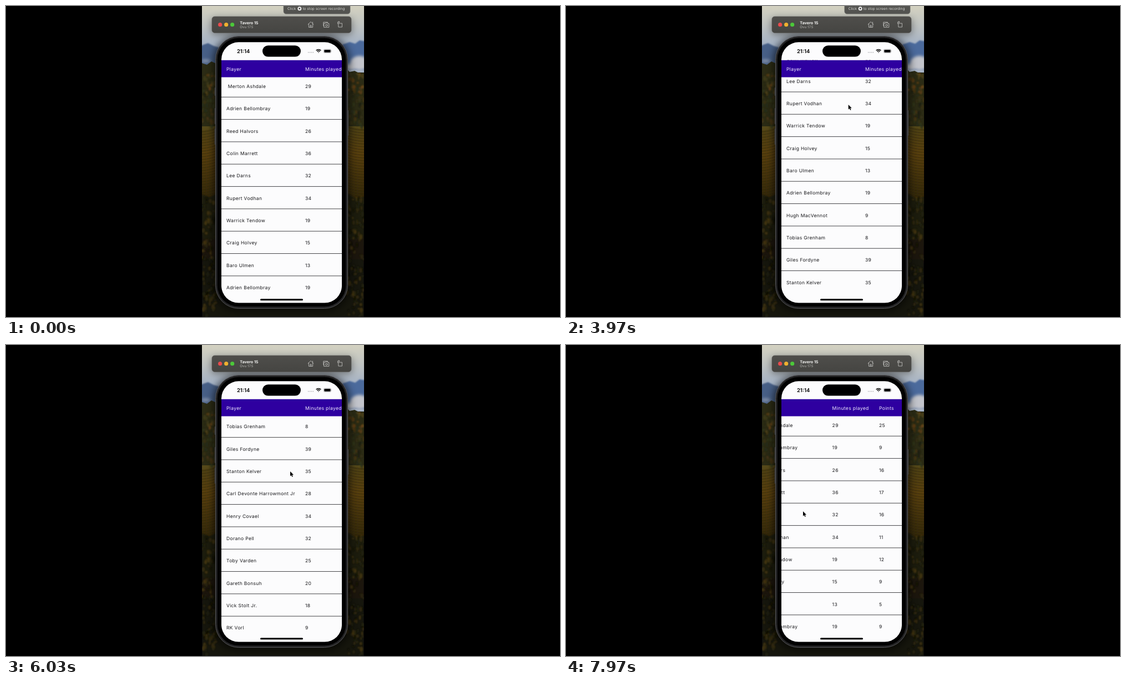
An HTML page that plays this animation: 998x561 px, repeating every 8 s.

```html
<!DOCTYPE html>
<html lang="en">
<head>
<meta charset="utf-8">
<title>Player table</title>
<style>
  html, body { margin: 0; width: 100%; height: 100%; overflow: hidden; background: #000; }
  svg { display: block; font-family: Inter, Roboto, sans-serif; text-rendering: geometricPrecision; }
  .table { font-size: 8.5px; letter-spacing: .35px; white-space: pre; }
  .icon { fill: none; stroke: #c9c9c7; stroke-width: .8; stroke-linejoin: round; stroke-linecap: round; }
</style>
</head>
<body>
<svg width="998" height="561" viewBox="0 0 998 561">
  <defs>
    <linearGradient id="sky" x2="0" y2="1">
      <stop offset="0" stop-color="#d3d1c0"/><stop offset=".3" stop-color="#bfc3c2"/><stop offset=".6" stop-color="#a3b1c4"/>
    </linearGradient>
    <linearGradient id="field" x2="0" y2="1">
      <stop offset="0" stop-color="#55491a"/><stop offset=".35" stop-color="#644812"/><stop offset="1" stop-color="#30270c"/>
    </linearGradient>
    <linearGradient id="woods" x2="0" y2="1">
      <stop offset="0" stop-color="#1f1d0b"/><stop offset="1" stop-color="#151408"/>
    </linearGradient>
    <linearGradient id="bar" x2="0" y2="1">
      <stop offset="0" stop-color="#4f4e4b"/><stop offset="1" stop-color="#454542"/>
    </linearGradient>
    <filter id="soft"><feGaussianBlur stdDeviation=".9"/></filter>
    <filter id="haze" x="-50%" y="-50%" width="200%" height="200%"><feGaussianBlur stdDeviation="2.5"/></filter>
    <filter id="shadow" x="-20%" y="-50%" width="140%" height="200%"><feGaussianBlur stdDeviation="7"/></filter>
    <clipPath id="desktop"><rect x="353" width="292" height="561"/></clipPath>
    <clipPath id="viewport"><rect x="388" y="97.5" width="217" height="419"/></clipPath>
  </defs>

  <g clip-path="url(#desktop)">
    <rect x="353" width="292" height="120" fill="url(#sky)"/>
    <g filter="url(#soft)">
      <path d="M345 76l10-6 9-3 10 5 14 4v40h-43z" fill="#465f86"/>
      <path d="M605 70l14-5 10 3 8-6 18 3v50h-50z" fill="#4c6a9c"/>
    </g>
    <g filter="url(#haze)" fill="#c2c4cb">
      <ellipse cx="637" cy="103" rx="17" ry="13"/>
      <ellipse cx="622" cy="110" rx="10" ry="6"/>
      <ellipse cx="360" cy="99" rx="9" ry="3" opacity=".5"/>
    </g>
    <path d="M345 108l8-5 9 3 8-6 9 4h226l14 15 9-2 8 4 19-2v110H345z" fill="#2b2b15"/>
    <rect x="353" y="217" width="292" height="140" fill="url(#field)"/>
    <g id="vines" fill="none" stroke="#2a200a" stroke-width="1.6" opacity=".85" filter="url(#soft)"/>
    <path d="M353 340l14 5 12-6h238l12 8 16-3v217H353z" fill="url(#woods)" filter="url(#soft)"/>
    <g id="foliage" filter="url(#soft)"/>

    <rect x="373" y="53" width="247" height="498" rx="45" opacity=".55" filter="url(#shadow)"/>
    <rect x="370" y="22" width="253" height="30" rx="6" opacity=".4" filter="url(#shadow)"/>

    <g id="notice">
      <rect x="500" y="-10" width="120" height="24.3" rx="4.5" fill="#535350" stroke="#777773" stroke-width=".7"/>
      <g font-size="6.55" fill="#d6d6d3">
        <text x="507" y="7">Click</text>
        <text x="534.5" y="7">to stop screen recording</text>
      </g>
      <circle cx="528.8" cy="4.7" r="3.5" fill="#eee"/>
      <rect x="527.5" y="3.4" width="2.6" height="2.6" rx=".4" fill="#444"/>
    </g>
  </g>

  <rect x="371" y="19" width="251" height="29.5" rx="5" fill="url(#bar)" stroke="#5d5c59" stroke-width=".6"/>
  <circle cx="385.7" cy="33.7" r="3.6" fill="#ec4a4c"/>
  <circle cx="396.7" cy="33.7" r="3.6" fill="#efb02f"/>
  <circle cx="407.7" cy="33.7" r="3.6" fill="#4cc83a"/>
  <text x="421.3" y="32.6" font-size="7.2" font-weight="700" fill="#f2f2f0">Tavero 15</text>
  <text x="421.3" y="40.4" font-size="6.2" fill="#b5b5b2">Ovu 17.5</text>
  <g class="icon">
    <path d="M544 33.3l5-4.8 5 4.8M545.4 32.2v6.2h7.2v-6.2M548 38.2v-3.4h2v3.4M552.4 29v2"/>
    <path d="M573 35.8h-1.2v-6.6h7.6v1.2M573 31.4h2.2l1-1.2h2.6l1 1.2h2v7h-8.8z"/>
    <circle cx="577.5" cy="34.8" r="1.8"/>
    <path d="M599.2 31.2h6.2v6.8h-6.2zM597.6 32v-3.2h3M599.5 27.6l1.3 1.2-1.3 1.3"/>
  </g>

  <g fill="#39393b">
    <rect x="375.8" y="147" width="2" height="15" rx="1"/>
    <rect x="375.8" y="184" width="2" height="29" rx="1"/>
    <rect x="375.8" y="221" width="2" height="29" rx="1"/>
    <rect x="615.2" y="188" width="2" height="46" rx="1"/>
  </g>
  <rect x="377.5" y="54.5" width="238" height="491" rx="42" fill="#202022" stroke="#58585a"/>
  <rect x="380.3" y="57.3" width="232.4" height="485.4" rx="39" stroke="#303032" stroke-width=".7"/>
  <rect x="388" y="65.3" width="217" height="470.2" rx="31" fill="#fcfcfd"/>
  <rect x="462" y="71.3" width="69" height="20.3" rx="10.15"/>
  <text x="427.6" y="84.9" font-size="9.5" font-weight="600" text-anchor="middle">21:14</text>
  <path d="M544.7 83.7h9.5" stroke="#b4b4b8" stroke-width="1.7" stroke-linecap="round" stroke-dasharray="0 2.9"/>
  <g fill="none" stroke="#000" stroke-width="1.5">
    <path d="M558.6 80.2a6.4 6.4 0 0 1 8.8 0M560.4 82.2a3.8 3.8 0 0 1 5.2 0"/>
    <path d="M563 84.8l-1.1-1.2a1.7 1.7 0 0 1 2.2 0z" fill="#000" stroke="none"/>
  </g>
  <rect x="572.3" y="77.9" width="13.3" height="6.9" rx="2.1" fill="none" stroke="#a5a5a8" stroke-width=".7"/>
  <rect x="573.3" y="78.9" width="11.3" height="4.9" rx="1.3"/>
  <path d="M586.4 80.2q1.2 1.1 0 2.3z" fill="#a5a5a8"/>

  <g class="table" clip-path="url(#viewport)">
    <g id="rows"></g>
    <g id="header">
      <rect x="388" y="97.5" width="217" height="31" fill="#2e00a0"/>
      <g id="headings" fill="#f0ecff"></g>
    </g>
  </g>
  <rect x="458" y="528.3" width="77" height="3" rx="1.5"/>
  <path id="cursor" d="M0 0v8.7l2-1.9 1.4 3.1 1.4-.6-1.4-3h2.7z" stroke="#fff" stroke-width=".7" paint-order="stroke"/>
</svg>

<script>
const LOOP = 8000, ROW = 40.32, MAX_SCROLL = 454;
const COLUMNS = [397, 539, 623.4];
const PLAYERS = [
  ['\u00a0Merton Ashdale', 29, 25], ['Adrien Bellombray', 19, 9], ['Reed Halvors', 26, 16],
  ['Colin Marrett', 36, 17], ['Lee Darns', 32, 16], ['Rupert Vodhan', 34, 11],
  ['Warrick Tendow', 19, 12], ['Craig Holvey', 15, 9], ['Baro Ulmen', 13, 5],
  ['Adrien Bellombray', 19, 9], ['Hugh MacVennot', 9], ['Tobias Grenham', 8],
  ['Giles Fordyne', 39], ['Stanton Kelver', 35], ['Carl Devonte Harrowmont Jr', 28],
  ['Henry Covael', 34], ['Dorano Pell', 32], ['Toby Varden', 25],
  ['Gareth Bonsuh', 20], ['Vick Stolt Jr.', 18], ['RK Vorl', 9]
];

// Each key: time, then values.
const CURSOR = [
  [1700, 575, 2], [2350, 498, 252], [2430, 498, 252], [3200, 500, 349], [3970, 508.7, 178],
  [4200, 511, 120], [4650, 516, 290], [5130, 519, 118], [5250, 519, 118], [5850, 512, 215],
  [6030, 512, 228], [6500, 513, 465], [6600, 513, 470], [7300, 486.4, 300], [7450, 486.4, 300],
  [7960, 427, 300]
];
const SCROLL_Y = [
  [3200, 0], [3970, 170.6], [4200, 228], [4650, 330], [5130, 500.8], [5250, 500.8],
  [5600, MAX_SCROLL], [5850, MAX_SCROLL], [6030, 441.2], [6500, -24.3], [6850, 0]
];
const SCROLL_X = [[7450, 0], [7960, 59.4]];

const el = id => document.getElementById(id);
const move = (id, x, y) => el(id).setAttribute('transform', `translate(${x} ${y})`);
const clamp = v => Math.min(1, Math.max(0, v));

function at(keys, t) {
  const next = keys.findIndex(k => k[0] > t);
  if (next < 0) return keys[keys.length - 1].slice(1);
  if (next === 0) return keys[0].slice(1);
  const a = keys[next - 1], b = keys[next];
  const p = (t - a[0]) / (b[0] - a[0]), e = p * p * (3 - 2 * p);
  return a.slice(1).map((v, i) => v + (b[i + 1] - v) * e);
}

const cells = (values, y) =>
  values.map((v, i) => `<text x="${COLUMNS[i]}" y="${y}">${v}</text>`).join('');

function buildTable() {
  el('headings').innerHTML = cells(['Player', 'Minutes played', 'Points'], 117);
  el('rows').innerHTML = PLAYERS.map((player, i) => {
    const y = 148.1 + i * ROW;
    return `<g fill="#18181b">${cells(player, y)}</g>
      <path d="M380 ${y + 16.2}h320" stroke="#3c3c3f" stroke-width=".95"/>`;
  }).join('');
}

function buildScenery() {
  let seed = 7;
  const random = (lo, hi) => {
    seed = (seed * 16807) % 2147483647;
    return lo + (hi - lo) * seed / 2147483647;
  };
  let vines = '';
  for (let y = 222; y < 345; y += 5) {
    vines += `<path d="M350 ${y + 5}q14 0 30-6M612 ${y - 5}q14 7 36 7"/>`;
  }
  el('vines').innerHTML = vines;

  const autumn = ['#5f3c12', '#7a4a18', '#3f3b18', '#2a2a14', '#54451c'];
  const pines = ['#33381a', '#191c0d', '#4a3614', '#252c18', '#3a3216'];
  const thicket = ['#2c270e', '#0f0f06', '#4a390f', '#1f200c', '#3a2f0e'];
  const leaves = (count, top, bottom, colors) => {
    let out = '';
    for (let i = 0; i < count; i++) {
      const x = i % 2 ? random(353, 379) : random(614, 645);
      const color = colors[Math.floor(random(0, colors.length))];
      out += `<ellipse cx="${x}" cy="${random(top, bottom)}" rx="${random(1, 3)}" ry="${random(1.5, 5)}" fill="${color}" opacity=".75"/>`;
    }
    return out;
  };
  el('foliage').innerHTML =
    leaves(70, 122, 158, autumn) + leaves(90, 150, 220, pines) + leaves(240, 346, 561, thicket);
}

function draw(now) {
  const t = now % LOOP;
  const [x, y] = at(CURSOR, t), [scrollY] = at(SCROLL_Y, t), [scrollX] = at(SCROLL_X, t);
  move('rows', -scrollX, -scrollY);
  move('headings', -scrollX, 0);
  move('header', 0, Math.max(0, -scrollY) - Math.max(0, scrollY - MAX_SCROLL));
  move('cursor', x, y);
  el('cursor').style.opacity = t < CURSOR[0][0] ? 0 : 1;

  const shrink = 1 - .015 * clamp(t / 600);
  el('notice').setAttribute('transform', `translate(${620 * (1 - shrink)} 0) scale(${shrink} 1)`);
  el('notice').style.opacity = 1 - clamp((t - 4400) / 300);
  requestAnimationFrame(draw);
}

buildTable();
buildScenery();
draw(performance.now());
</script>
</body>
</html>
```
